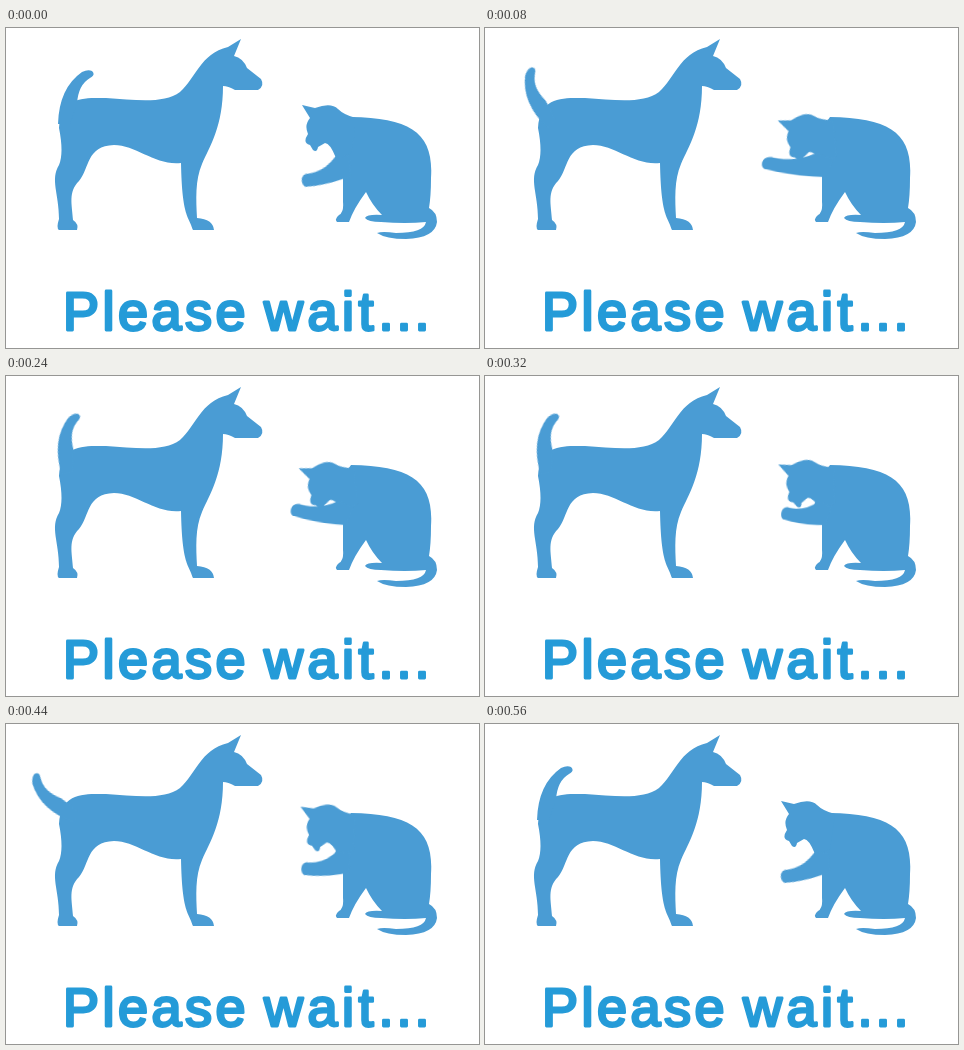
An HTML page that plays this animation: 473x320 px, repeating every 600 ms.

```html
<!DOCTYPE html>
<html lang="en">
<head>
<meta charset="utf-8">
<title>Please wait</title>
<style>
  html, body { margin: 0; width: 100%; height: 100%; overflow: hidden; background: #fff; }
  svg { display: block; width: 473px; height: 320px; }
  .pets { fill: #4a9cd4; }
  .label {
    font: 54px "Liberation Sans", Arial, sans-serif;
    fill: #259bd8; stroke: #259bd8; stroke-width: 2.8; stroke-linejoin: round;
  }

  /* 15 held poses of 40 ms; each part turns about its joint */
  .tail, .head, .paw { animation: 600ms infinite; }
  .tail { transform-origin: 62px 86px; animation-name: wag; }
  .head { transform-origin: 345px 100px; animation-name: nod; }
  .paw { transform-origin: 340px 138px; animation-name: lick; }

  @keyframes wag {
    0% { transform: rotate(0deg); animation-timing-function: steps(3); }
    20% { transform: rotate(-72deg); animation-timing-function: steps(4); }
    46.666% { transform: rotate(0deg); animation-timing-function: steps(4); }
    73.333% { transform: rotate(-72deg); animation-timing-function: steps(3); }
    93.333%, 100% { transform: rotate(0deg); }
  }

  @keyframes nod {
    0% { animation-timing-function: steps(4); }
    0%, 93.333%, 100% { transform: translate(0px, 0px) rotate(0deg); }
    26.666% { transform: translate(1px, 4px) rotate(-17deg); animation-timing-function: steps(10); }
  }

  @keyframes lick {
    0% { animation-timing-function: steps(4); }
    0%, 93.333%, 100% { transform: rotate(-19deg) scaleX(.77); }
    26.666% { transform: rotate(9deg) scaleX(1.1); animation-timing-function: steps(4); }
    53.333% { transform: rotate(2deg) scaleX(.72); animation-timing-function: steps(6); }
  }
</style>
</head>
<body>
<svg viewBox="0 0 473 320">
  <g class="pets">
    <path class="dog" d="M235 11 L228 28 Q237 30 241 40 L255 51 Q259 58 252 62 L229 62 Q222 58 217 58
      C217 98 204 118 196 136 C189 152 190 172 191 190 Q207 191 208 202 L187 202
      C183 188 176 190 175 135 C150 138 130 117 108 117 C80 118 84 140 73 153
      C62 164 66 176 67 192 Q73 196 71 202 L53 202 Q50 200 53 191
      C53 165 44 152 53 137 Q58 125 53 100 C55 68 78 70 100 70
      C130 72 158 76 174 64 C190 50 194 26 222 19 Z"/>
    <path class="tail" d="M52 96 Q53 60 76 44 Q82 41 86 43 Q90 47 84 50 Q72 57 71 76 L64 96 Z"/>
    <path class="cat" d="M340 96 L345 89 C405 90 428 105 425 150 Q425 168 423 180
      Q431 184 431 194 Q429 210 400 211 Q380 211 371 205 Q376 203 390 205
      Q418 205 420 194 Q400 196 375 194 Q362 194 359 190 Q361 186 376 187
      Q366 177 360 164 Q348 180 343 194 L331 194 Q328 191 333 187
      Q338 184 337 174 V147 L329 130 Z"/>
    <path class="head" d="M296 77 L309 80 Q325 74 332 81 Q338 87 350 90 L345 125 L330 130
      Q324 115 319 115 L312 119 Q311 125 307 122 L304 117 Q296 115 302 106 Q298 97 304 90 Z"/>
    <path class="paw" d="M330 126 Q312 136 290 133 C278 130 276 145 284 145 Q305 150 342 149 L348 130 Z"/>
  </g>
  <g class="label">
    <text x="57" y="301.6" letter-spacing="3.5">Please</text>
    <text x="258" y="301.6" letter-spacing="4.5">wait</text>
    <text x="372.5" y="301.6" letter-spacing="3">...</text>
  </g>
</svg>
</body>
</html>
```
